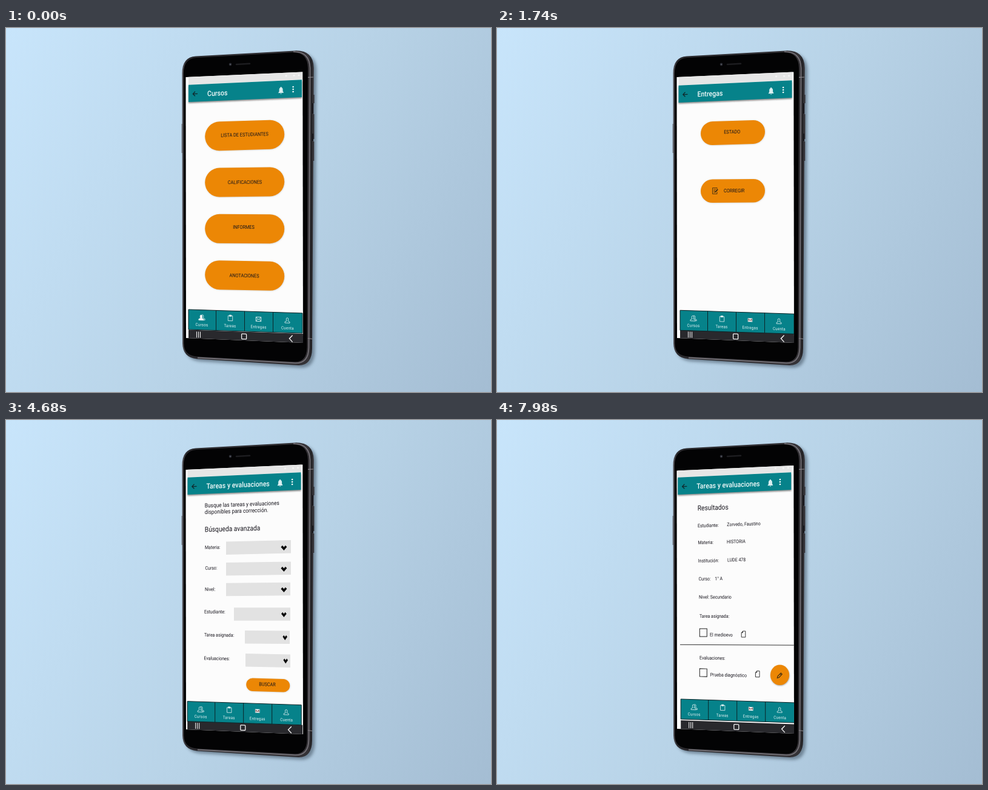
An HTML page that plays this animation: 800 by 600 pixels, repeating every 8000 ms.

```html
<!DOCTYPE html>
<html lang="es">
<head>
<meta charset="utf-8">
<style>
  html, body { margin: 0; height: 100%; overflow: hidden; }
  body { background: linear-gradient(119deg, #c8e5fb, #b8d3e7 53%, #a4bdd3); }
  svg { display: block; width: 100%; height: 100%; }
  text { font-family: Roboto, "Liberation Sans", sans-serif; }
</style>
</head>
<body>
<svg id="stage" viewBox="0 0 800 600"></svg>
<script>
const TEAL = '#06828a', ORANGE = '#ec8705', INK = '#16141c', SQUEEZE = 0.875;

// The phone is turned: horizontal lines tilt according to their height.
const tilt = y => (y - 313) * 0.00021;
const place = (x, y, sx = 1) => `transform="matrix(${sx} ${tilt(y) * sx} 0 1 ${x} ${y})"`;
const group = (x, y, inner, attrs = '') => `<g ${place(x, y)} ${attrs}>${inner}</g>`;
const path = (d, attrs = '') => `<path d="${d}" ${attrs}/>`;
const poly = (points, fill, attrs = '') => `<polygon points="${points}" fill="${fill}" ${attrs}/>`;

const text = (x, y, str, size = 8, attrs = '') =>
  `<text ${place(x, y, SQUEEZE)} font-size="${size}" fill="${INK}" ${attrs}>${str}</text>`;
const centred = (x, y, str, size = 8.35, attrs = '') =>
  text(x, y + size * 0.355, str, size, `text-anchor="middle" ${attrs}`);
const box = (x, y, w, h, fill, r = 0, attrs = '') =>
  group(x, y, `<rect x="${-w / 2}" y="${-h / 2}" width="${w}" height="${h}" rx="${r}" fill="${fill}" ${attrs}/>`);
const pill = (x, y, w, h) =>
  box(x + 0.4, y + 0.5, w, h, '#7775', h / 2, 'filter="url(#soft)"') + box(x, y, w, h, ORANGE, h / 2);

const line = (width, color = '#e4f2f3') => `fill="none" stroke="${color}" stroke-width="${width}"`;

function header(title, dx, dy, dotShift = 0) {
  const dots = [-4, 0, 4].map(y => `<circle cy="${y}" r="1.35"/>`).join('');
  return `<g transform="translate(${dx} ${dy})">` +
    poly('301,78 489,70 489,85 301,94', '#e6e6e6') +
    poly('301,96 488,88 488,116 301,124', '#3338', 'filter="url(#soft)"') +
    poly('301,93.7 488,85.2 488,114 301,122', TEAL) +
    group(312, 108.5, path('M4 0H-3.5M0-3.8L-3.7 0L0 3.8', line(1.3, '#10282c'))) +
    text(332, 112.3, title, 12.1, 'style="fill:#f2fafa" font-weight="500"') +
    group(453.6, 103, path('M-4.2 4V3L-3 1.6V-1.6Q-3-4.4-.8-5V-6H.8V-5Q3-4.4 3-1.6V1.6L4.2 3V4ZM-1.3 4.8H1.3Q0 7-1.3 4.8Z'), 'fill="#d9eef0"') +
    group(473.6 + dotShift, 101, dots, 'fill="#f2fafa"') +
    [462, 475, 483].map(x => `<circle cx="${x}" cy="${98.6 - x * 0.043}" r="1.5" fill="#f5f5f5"/>`).join('') +
    '</g>';
}

const person = 'M-1.7-.8Q-2.2-4.4 0-4.4T1.7-.8L1 .8L4 2.4V4.2H-4V2.4L-1 .8Z';

function nav(active, dx, dy, barDy) {
  const icons = [
    group(322.5, 477, path(person, 'transform="translate(1.6 0)"') +
      path(person, `fill="${active === 0 ? '#f5f5f5' : TEAL}" transform="translate(-.6 .4)"`), line(0.8)),
    group(370, 478, path('M-3.7-3.6H3.7V4.6H-3.7Z') + path('M-1.7-4.8H1.7V-2.8H-1.7Z', 'fill="#e4f2f3"'), line(0.8)),
    group(416.5, 480, active === 2
      ? path('M-3.8-3H3.8V3H-3.8Z', 'fill="#f5f5f5" stroke="none"') + path('M-2.6 2V-1.5L0 .8L2.6-1.5V2', line(1, '#755'))
      : path('M-4.2-3.5H4.2V3.5H-4.2ZM-4.2-3.2L0 .5L4.2-3.2M-4.2 3.2L-1.2 0M4.2 3.2L1.2 0'), line(0.9)),
    group(464, 482, path(person), line(0.8))
  ];
  const labels = [['Cursos', 323], ['Tareas', 369.5], ['Entregas', 416.5], ['Cuenta', 464.5]];
  const dividers = [346.5, 393.5, 440.5].map(x => {
    const y = 464 + (x - 301) * 0.031;
    return path(`M${x} ${y}V${y + 33}`, line(1, '#0c2427'));
  });
  return `<g transform="translate(${dx} ${barDy})">` +
    poly('301,497.5 491,504 491,530 301,530', '#29292d') +
    group(317.5, 505.5, path('M-3-5V5M0-5V5M3-5V5'), line(1.1, '#eee')) +
    group(392.6, 508.5, '<rect x="-4" y="-4.2" width="8" height="8.4" rx="1"/>', line(1.3, '#f4f4f4')) +
    group(470, 512, path('M2.6-5.5L-2.6 0L2.6 5.5'), line(1.4, '#f4f4f4')) +
    `</g><g transform="translate(${dx} ${dy})">` +
    poly('301,464 489,470 489,503 301,497', TEAL, 'stroke="#0c2427" stroke-width="1"') +
    dividers.join('') + icons.join('') +
    labels.map(([s, x]) => centred(x, 489 + (x - 323) * 0.038, s, 7, 'style="fill:#e6f3f4" letter-spacing=".3"')).join('') +
    '</g>';
}

function courses() {
  const rows = [['LISTA DE ESTUDIANTES', 393.5, 175.6], ['CALIFICACIONES', 394, 254],
    ['INFORMES', 392, 328], ['ANOTACIONES', 393, 408]];
  return rows.map(([s, x, y], i) => pill(393.7, 177 + i * 77, 131, 48) + centred(x, y, s)).join('');
}

function deliveries() {
  return pill(389, 172.5, 106, 39) + centred(387.7, 171, 'ESTADO') +
    pill(389, 268.5, 106, 38.5) + centred(391.2, 268, 'CORREGIR') +
    group(360, 268.5, path('M3 1.5V5H-4.5V-5H3V-3.5M-3-2.5H1.5M-3 0H0M-3 2.5H-1') +
      path('M-.5 2.5L4.2-2.6', line(1.7, '#3a2a12')), line(0.8, '#3a2a12'));
}

function search() {
  // label, label x, label y, field left, field right, field y
  const fields = [
    ['Materia:', 328, 210, 363, 470, 210], ['Curso:', 328.5, 244, 363, 470, 245],
    ['Nivel:', 328, 279, 363, 469, 279], ['Estudiante:', 327, 316, 376, 469, 320],
    ['Tarea asignada:', 327, 354, 394, 468, 358], ['Evaluaciones:', 326.5, 392.5, 395, 469, 396.5]
  ];
  return text(327.8, 144.3, 'Busque las tareas y evaluaciones', 9.55) +
    text(327.8, 155, 'disponibles para corrección.', 9.55) +
    text(327.8, 184.4, 'Búsqueda avanzada', 11.7) +
    fields.map(([s, lx, ly, l, r, y], i) => {
      const wide = i < 3 ? 5 : i < 4 ? 4.4 : 3.8;
      return text(lx, ly + 2.8, s) + box((l + r) / 2, y, r - l, 21.5, '#e2e2e2') +
        group(i < 4 ? 458.4 : 456.2 + i, y + 0.8,
          path(`M${-wide}-1.4L${-wide / 2}-4L0-1.4L${wide / 2}-4L${wide}-1.4L0 4.2Z`), 'fill="#0b0b0b"');
    }).join('') +
    pill(432.2, 437, 72, 21.5) + centred(431, 435.6, 'BUSCAR');
}

function results() {
  const lines = [
    [331, 177, 'Estudiante:'], [379.3, 175, 'Zorvedo, Faustino'],
    [331.5, 204.7, 'Materia:'], [379, 203.4, 'HISTORIA'],
    [331.7, 234.8, 'Institución:'], [380, 233.4, 'LUDE 478'],
    [332.5, 264.6, 'Curso:'], [359.3, 264.2, '1° A'],
    [333, 294.6, 'Nivel: Secundario'], [334, 326, 'Tarea asignada:'],
    [351, 356.6, 'El medioevo'], [334, 394.6, 'Evaluaciones:'],
    [351.7, 422.4, 'Prueba diagnóstico']
  ];
  const check = y => box(340.3, y, 12, 13, 'none', 0, 'stroke="#222" stroke-width="1"');
  const sheet = (x, y) => group(x, y, path('M-1-5H3.3V5H-3.3V-2.4ZM-1-5V-2.4H-3.3'), line(0.9, '#222'));
  return text(330.8, 149.2, 'Resultados', 11.7) +
    lines.map(l => text(...l)).join('') +
    check(350.5) + check(416.5) + sheet(406.5, 353) + sheet(429.7, 418.7) +
    path('M302 370.3L490 371.2', line(1, '#333')) +
    '<ellipse cx="467" cy="421.6" rx="15.5" ry="16.5" fill="#5558" filter="url(#soft)"/>' +
    `<ellipse cx="466.5" cy="420.3" rx="15.6" ry="16.8" fill="${ORANGE}"/>` +
    group(466.3, 421, path('M-4 4.4L-3.3 1.4L2-4L4-2L-1.2 3.5ZM.6-2.6L2.6-.6'), line(1.1, '#3a2a12'));
}

// start time, corner heights of the display (top l/r, bottom l/r), contents
const screens = [
  [0, [81, 72.5, 511, 519], header('Cursos', 0, 0) + courses() + nav(0, 0, 0, 0)],
  [1600, [81, 72.5, 511, 519], header('Entregas', -1.5, 1) + deliveries() + nav(2, 1, 1.3, 0)],
  [3200, [82, 73.5, 510, 518], header('Tareas y evaluaciones', -1.5, 1) + search() + nav(2, -1.8, -0.3, -1.3)],
  [7200, [83.5, 75, 509, 517], header('Tareas y evaluaciones', -2.7, 1, -4) + results() + nav(2, 2.2, -4, -2.5)]
];

const body = 'M290.5 76Q290 48 313 46.5L476 37.4Q507 36 507.8 66L505 528Q504.5 557 482 556L315 545.5Q291.5 543 291 520Z';
const face = 'M292.8 76Q292.5 50.5 314 49L472 40.3Q497.5 39.5 498 66L496.5 526Q496 551 476 550.3L315 541.5Q293.5 540 293.3 520Z';

const phone =
  path(body, 'fill="#3a4b5c" opacity=".55" transform="translate(4.5 4)" filter="url(#shade)"') +
  path('M290.2 158V206', line(1, '#57565c')) +
  path('M507.8 110V124M507.6 142V183M507.4 187V219', line(1.6, '#343237')) +
  path(body, 'fill="url(#metal)"') +
  path('M474 39.2Q500.5 38.5 501.6 66L499.5 527Q499 553 477 552.4L316 543.5', line(1.8, '#737076')) +
  path(face, 'fill="#030304"') +
  path('M506 174V186M506 124V141', line(1.6, '#111014')) +
  path('M498 511.5L505 512.5M498 81.4L507 81', line(1.1, '#8a878c')) +
  '<circle cx="370" cy="60" r="2.4" fill="#25272d"/><circle cx="370" cy="60" r="1" fill="#5a5d66"/>' +
  path('M380 60L402 58.8', line(2.6, '#1d1d20') + ' stroke-linecap="round"');

const clips = screens.map(([, [tl, tr, bl, br]], i) =>
  `<clipPath id="display${i}">${poly(`296.5,${tl} 489.3,${tr} 490,${br} 297,${bl}`, '#000')}</clipPath>`).join('');

document.getElementById('stage').innerHTML =
  `<defs>${clips}
    <linearGradient id="metal"><stop offset="0" stop-color="#56545a"/><stop offset=".03" stop-color="#29282c"/>
      <stop offset=".96" stop-color="#343236"/><stop offset=".98" stop-color="#222124"/><stop offset="1" stop-color="#3c3a3f"/></linearGradient>
    <filter id="soft"><feGaussianBlur stdDeviation="1"/></filter>
    <filter id="shade" x="-10%" width="120%"><feGaussianBlur stdDeviation="2.6"/></filter>
  </defs>${phone}` +
  screens.map(([, , inner], i) =>
    `<g class="screen" clip-path="url(#display${i})"><rect x="290" y="60" width="210" height="470" fill="#fcfcfc"/>${inner}</g>`).join('');

const layers = document.querySelectorAll('.screen');
const begin = performance.now();

function draw() {
  const t = Math.max(0, performance.now() - begin) % 8000;
  const current = screens.filter(([start]) => start <= t).length - 1;
  layers.forEach((layer, i) => layer.setAttribute('display', i === current ? 'inline' : 'none'));
  requestAnimationFrame(draw);
}
draw();
</script>
</body>
</html>
```
